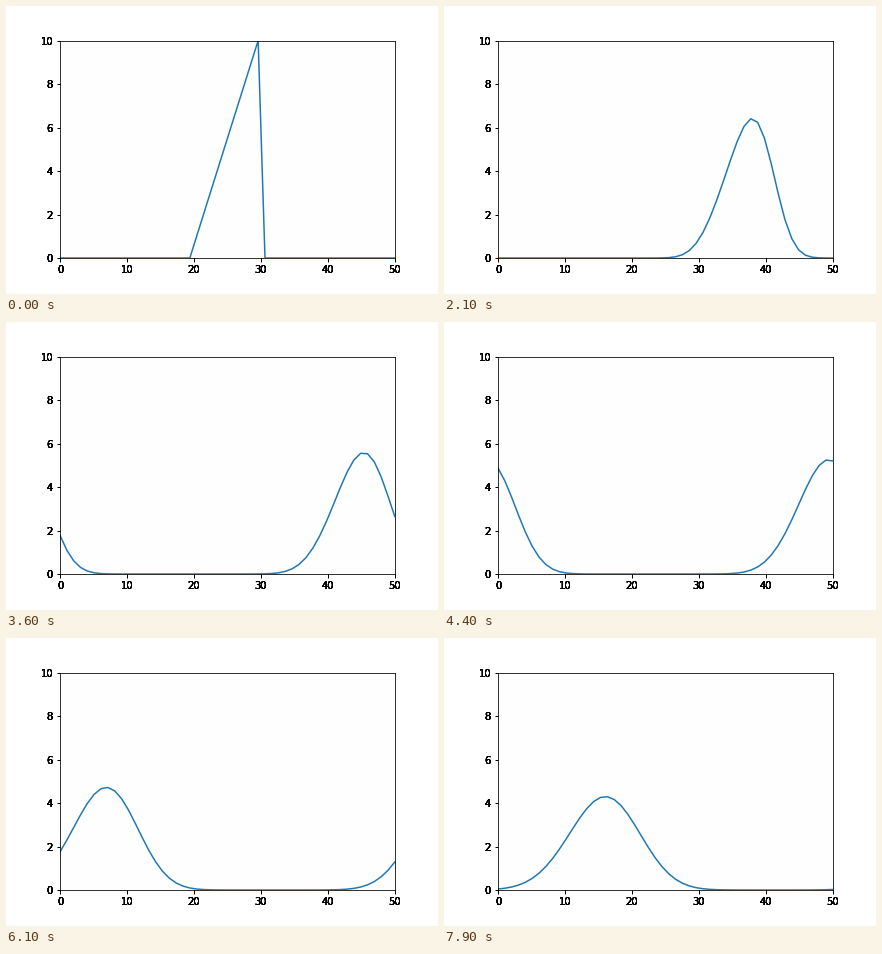
A matplotlib script for the animation above (8000 ms loop, 432x288 px).

```python
import numpy as np
import matplotlib.pyplot as plt
from matplotlib.animation import FuncAnimation
from matplotlib.text import Text

N = 50            # grid points, periodic domain
COURANT = 0.5
STEPS = 80

plt.rcParams.update({"font.family": "DejaVu Sans", "font.size": 10})


class HeavyText(Text):
    """Text drawn several times over, which hardens its soft edges."""

    def draw(self, renderer):
        for _ in range(8):
            super().draw(renderer)


def sawtooth():
    i = np.arange(N)
    return np.where((i > 19) & (i < 30), i - 19.0, 0.0)


def advect(u):
    """One first-order upwind step."""
    return u - COURANT * (u - np.roll(u, 1))


def solve(steps):
    states = [sawtooth()]
    while len(states) < steps:
        states.append(advect(states[-1]))
    return states


def add_label(x, y, value, placement):
    transform, va, ha = placement
    fig.add_artist(HeavyText(x, y, str(value), transform=transform,
                             va=va, ha=ha))


fig = plt.figure(figsize=(6, 4), dpi=72, facecolor="white")
ax = fig.add_axes([0.125, 0.125, 0.775, 0.755], facecolor="#fefefe")
xticks, yticks = range(0, 51, 10), range(0, 11, 2)
ax.set(xlim=(0, 50), ylim=(0, 10), xticks=xticks, yticks=yticks)
ax.tick_params(width=1, labelbottom=False, labelleft=False)
for v in xticks:
    add_label(v, 0, v, ax.get_xaxis_text1_transform(7))
for v in yticks:
    add_label(0, v, v, ax.get_yaxis_text1_transform(7))

x = np.linspace(0, 50, N)
states = solve(STEPS)
line, = ax.plot(x, states[0], color="#1f77b4", lw=1.5)


def update(n):
    line.set_ydata(states[n])
    return line,


anim = FuncAnimation(fig, update, frames=STEPS, interval=100,
                     repeat=True, repeat_delay=0)
plt.show()
```
